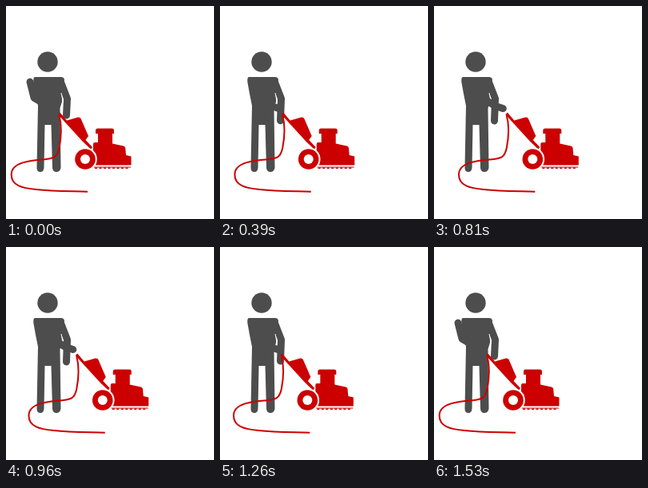
These frames come from a looping animation (260x267 px, 1560 ms). An HTML page:

```html
<!DOCTYPE html>
<html lang="en">
<head>
<meta charset="utf-8">
<title>Floor machine</title>
<style>
  html, body { margin: 0; height: 100%; overflow: hidden; background: #fff; }
  svg { display: block; width: 100%; height: 100%; }
  .man { fill: #4d4d4d; }
  .arm { fill: none; stroke: #4d4d4d; stroke-width: 9; stroke-linecap: round; stroke-linejoin: round; }
  .machine { fill: #c00; }
  .line { fill: none; stroke: #c00; stroke-linejoin: round; }
</style>
</head>
<body>
<svg viewBox="0 0 260 267">
  <g class="man">
    <circle cx="52" cy="70" r="12.700"/>
    <path d="M36 89H69Q72 89 73 92L70 107V120L67.500 128L68.500 203Q67.500 208 63 208Q58.500 208 58 203L56.500 149H48.500L47.500 203Q47 208 43 208Q38.500 208 38.500 203L40 125L37 110L34.300 95Q34 89 36 89Z"/>
  </g>
  <path id="nearArm" class="arm"/>
  <path d="M69 109L71.500 121" stroke="#fff" stroke-width="1"/>
  <g id="moving">
    <path class="arm" d="M30 95L35 115L53 125.500L62 128.500"/>
    <g class="machine">
      <path d="M65 136L67.500 133.500L76 143.500L90 139.500Q92.500 139 93.500 141L103 163L99.500 168L108 177L106 179.500L96 170Z"/>
      <path d="M112 156Q112 153.500 114.500 153.500H132.500Q135 153.500 135 156V160H133V172.500L147 175.500Q149 176 149.200 178L150 187L156.500 188.500V199.500H109V173Q109 171 111 171H115V160H112Z"/>
      <circle cx="99" cy="192" r="13.800" stroke="#fff" stroke-width="2"/>
      <circle cx="99" cy="192" r="6" fill="#fff"/>
    </g>
    <path class="line" d="M110 202H156"/>
    <path class="line" d="M111 203.300H155" stroke-width="1.600" stroke-dasharray="3 2.500"/>
    <path class="line" d="M66.500 137C70 150 69 165 66.500 178C64 190 59 191 50 192C32 193.500 7 195 6.700 211C6.500 225 20 228.500 38 230C60 232.500 80 232 102 232.700" stroke-width="2"/>
  </g>
</svg>
<script>
const LOOP = 1560, STEP = 30, REACH = 25.2;
const moving = document.getElementById('moving');
const nearArm = document.getElementById('nearArm');

function draw(now) {
  const t = Math.floor(now % LOOP / STEP) * STEP;
  // Steady push out, short rest, slightly faster pull back
  const dx = REACH * Math.min(1, t / 840, (1530 - t) / 660);
  moving.setAttribute('transform', `translate(${dx} 0)`);
  const handY = 137 + Math.min(dx, 12) * 0.58;
  nearArm.setAttribute('d', `M68 94L76.500 116L75.500 ${handY}`);
  requestAnimationFrame(draw);
}
requestAnimationFrame(draw);
</script>
</body>
</html>
```
